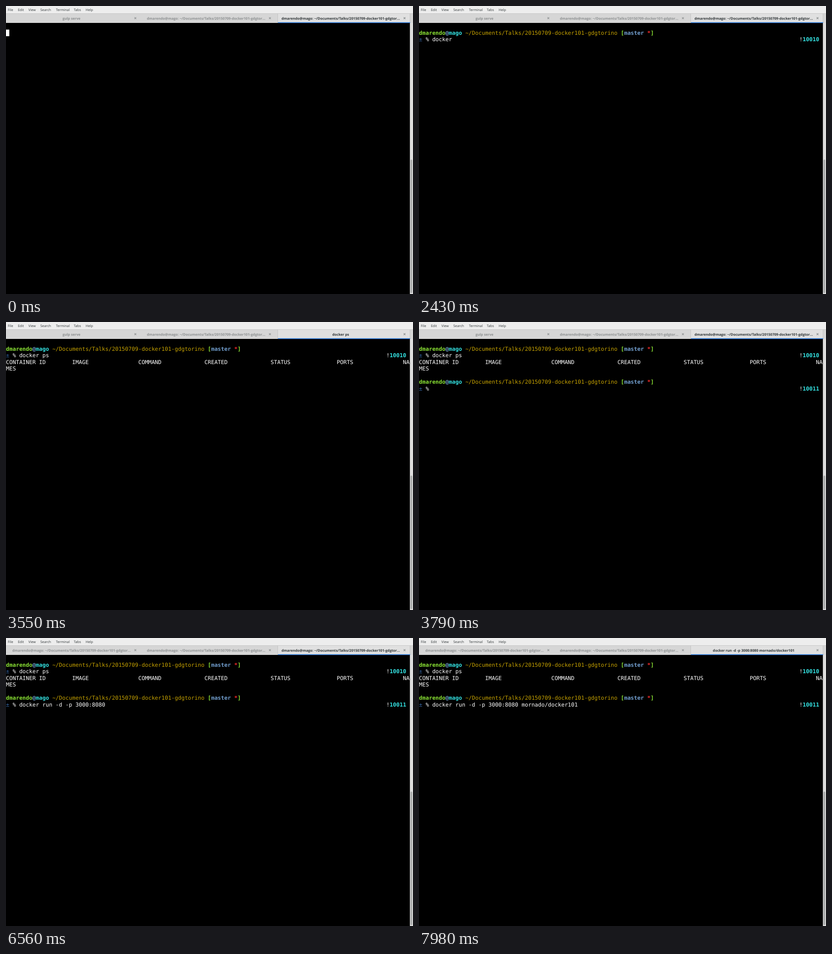
Animation, 889 px wide and 630 px high, one loop 8000 ms. Source, as an HTML page with a canvas:

```html
<!DOCTYPE html>
<html lang="en">
<head>
<meta charset="utf-8">
<title>Terminal</title>
<style>
  html, body { margin: 0; width: 100%; height: 100%; overflow: hidden; background: #000; }
  canvas { display: block; }
</style>
</head>
<body>
<canvas id="stage" width="889" height="630"></canvas>
<script>
const ctx = document.getElementById('stage').getContext('2d');
ctx.textRendering = 'geometricPrecision';

const LOOP = 8000;
const COL = 7.2246, ROW = 14.45, TOP = 51.6, BASE = 62.85;
const MONO = '12px "DejaVu Sans Mono", monospace';
const UI = '"Open Sans", sans-serif';
const GREEN = '#8ae234', CYAN = '#34e2e2', BLUE = '#729fcf', WHITE = '#fff';

const USER = 'dmarendo', HOST = 'mago';
const DIR = '~/Documents/Talks/20150709-docker101-gdgtorino';
const HOME = `${USER}@${HOST}: ${DIR.slice(0, -3)}...`;
const RUN = 'docker run -d -p 3000:8080 mornado/docker101';
const MENU = [['File', 4], ['Edit', 26], ['View', 49], ['Search', 75],
              ['Terminal', 109], ['Tabs', 148], ['Help', 174]];
// time at which each character of the first command appears
const KEYS = [1350, 1490, 1580, 2270, 2350, 2430, 2600, 2820, 2960];

function rect(color, x, y, w, h) {
  ctx.fillStyle = color;
  ctx.fillRect(x, y, w, h);
}

function label(str, x, y, color, font, align = 'left') {
  ctx.font = font;
  ctx.textAlign = align;
  ctx.fillStyle = color;
  ctx.fillText(str, x, y);
}

function put(str, col, row, color = WHITE, bold = false) {
  label(str, col * COL, Math.round(BASE + row * ROW), color, (bold ? 'bold ' : '') + MONO);
}

function cursor(col, row) {
  rect(WHITE, col * COL, TOP + row * ROW, COL, ROW);
}

function prompt(row, number, typed) {
  let col = 0;
  const add = (str, color, bold = true) => {
    put(str, col, row, color, bold);
    col += str.length;
  };
  add(USER, GREEN);
  add('@', BLUE);
  add(HOST + ' ', CYAN);
  add(DIR + ' ', '#c4a000', false);
  add('[', GREEN);
  add('master ', BLUE);
  add('*', '#ef2929');
  add(']', GREEN);
  put('±', 0, row + 1, '#3465a4');
  put('% ' + typed, 2, row + 1);
  put('!', 115, row + 1);
  put(number, 116, row + 1, CYAN, true);
}

function tab(i, title) {
  const active = i === 2, mid = 143 + i * 294;
  label(title, mid, 30, active ? '#2e3436' : '#8d9091', `bold 7.65px ${UI}`, 'center');
  const x = mid + 139.5, y = 26.7;
  ctx.strokeStyle = active ? '#85898a' : '#8d9091';
  ctx.lineWidth = 1.2;
  ctx.beginPath();
  ctx.moveTo(x - 2, y - 2); ctx.lineTo(x + 2, y + 2);
  ctx.moveTo(x + 2, y - 2); ctx.lineTo(x - 2, y + 2);
  ctx.stroke();
}

function chrome(t) {
  rect('#ededed', 0, 0, 889, 16);
  rect('#d6d6d6', 0, 16, 889, 21);
  rect('#c6c6c6', 0, 16, 889, 1);
  rect('#e0e0e0', 594, 17, 289, 20);
  rect('#c4c4c4', 593, 17, 1, 20);
  rect('#c4c4c4', 882, 17, 1, 20);
  rect('#2a7fe4', 594, 35.6, 289, 1.6);
  rect('#dedede', 882.2, 37, 6.8, 593);
  ctx.fillStyle = '#a9abab';
  ctx.beginPath();
  ctx.roundRect(883.5, 336, 4, 292, 2);
  ctx.fill();

  for (const [name, x] of MENU) label(name, x, 11, '#2e3436', `7.4px ${UI}`);
  tab(0, t < 6460 ? 'gulp serve' : HOME);
  tab(1, HOME);
  tab(2, t >= 7980 ? RUN : t >= 3300 && t < 3690 ? 'docker ps' : HOME);
}

function terminal(t) {
  if (t < 100) return cursor(0, 0);
  const typed = KEYS.filter(k => t >= k).length;
  prompt(0, '10010', 'docker ps'.slice(0, typed));
  if (t < 1580) cursor(4 + typed, 1);
  if (t >= 3300 && t < 3450) cursor(0, 2);
  if (t >= 3450) {
    ['CONTAINER ID', 'IMAGE', 'COMMAND', 'CREATED', 'STATUS', 'PORTS', 'NA']
      .forEach((head, i) => put(head, i * 20, 2));
    put('MES', 0, 3);
    if (t < 3550) cursor(0, 4);
  }
  if (t >= 3790) {
    // five characters arrive every 100 ms, the last three after a pause
    const steps = Math.floor((t - 6060) / 100);
    const count = t < 6060 ? 0 : t < 7680 ? Math.min(41, 1 + 5 * steps) : RUN.length;
    prompt(5, '10011', RUN.slice(0, count));
  }
}

const start = performance.now();
function draw() {
  const t = Math.max(0, performance.now() - start) % LOOP;
  rect('#000', 0, 0, 889, 630);
  terminal(t);
  chrome(t);
  requestAnimationFrame(draw);
}
draw();
</script>
</body>
</html>
```
